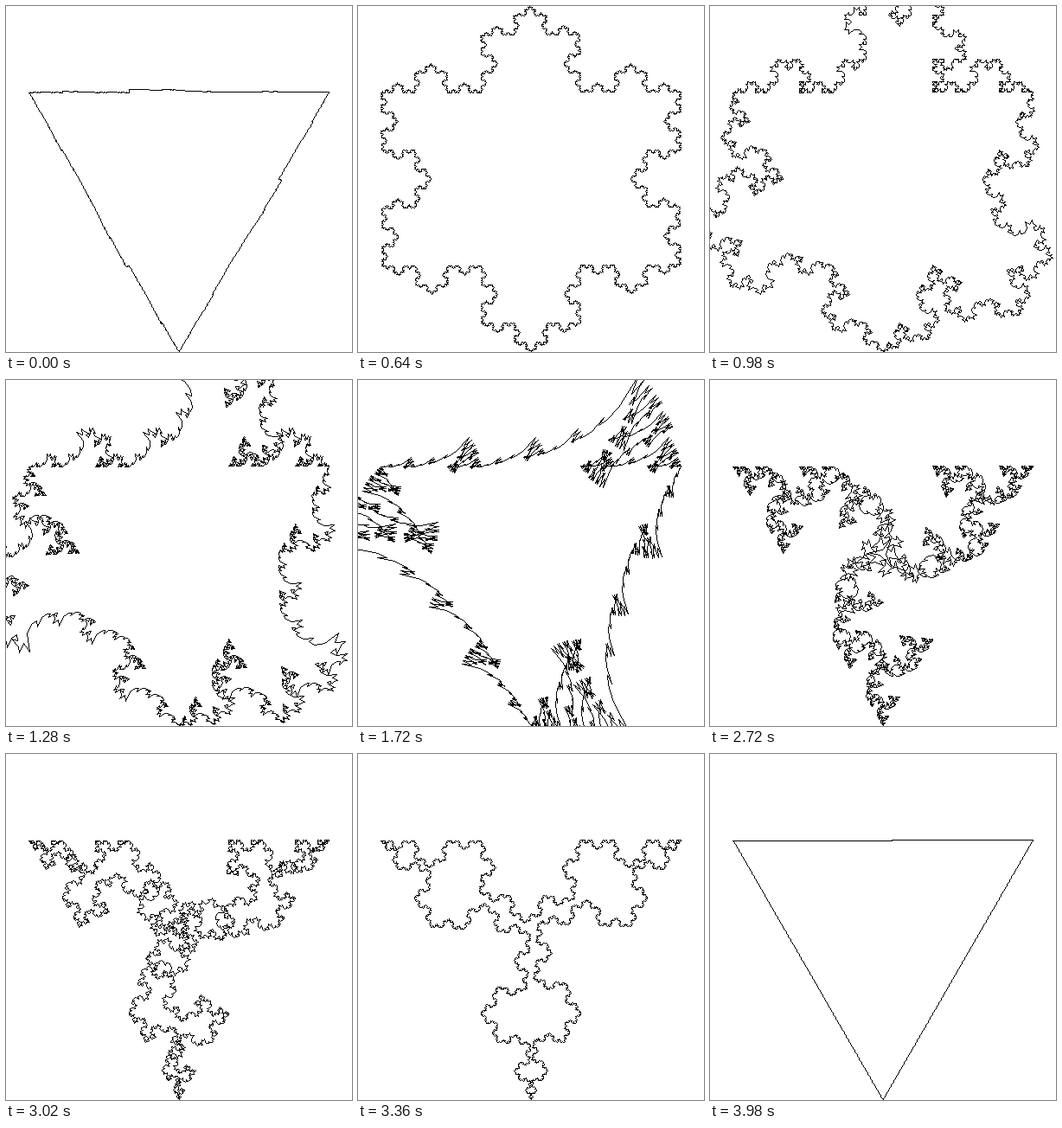
These frames come from a looping animation (400x400 px, 4 s). An HTML page with a canvas:

```html
<!DOCTYPE html>
<html lang="en">
<head>
<meta charset="utf-8">
<title>Turning Koch curve</title>
<style>
html, body { margin: 0; width: 100%; height: 100%; overflow: hidden; background: #fff; }
canvas { display: block; width: 400px; height: 400px; image-rendering: pixelated; }
</style>
</head>
<body>
<canvas id="stage" width="400" height="400"></canvas>
<script>
const SIZE = 400, STEPS = 200, STEP_MS = 20, DEPTH = 5;
const ctx = document.getElementById('stage').getContext('2d');
const image = ctx.createImageData(SIZE, SIZE);
const pixels = new Uint32Array(image.data.buffer);
const WHITE = 0xffffffff, BLACK = 0xff000000;

function corner(angle) {
  return [200 + 200 * Math.cos(angle), 200 + 200 * Math.sin(angle)];
}
const right = corner(11 * Math.PI / 6);
const left = corner(7 * Math.PI / 6);
const bottom = corner(Math.PI / 2);

// Crisp one-pixel line between whole-pixel points
function line(x0, y0, x1, y1) {
  x0 = Math.floor(x0); y0 = Math.floor(y0);
  x1 = Math.floor(x1); y1 = Math.floor(y1);
  const dx = Math.abs(x1 - x0), dy = -Math.abs(y1 - y0);
  const sx = x0 < x1 ? 1 : -1, sy = y0 < y1 ? 1 : -1;
  let err = dx + dy;
  for (;;) {
    if (x0 >= 0 && x0 < SIZE && y0 >= 0 && y0 < SIZE) pixels[y0 * SIZE + x0] = BLACK;
    if (x0 === x1 && y0 === y1) return;
    const e2 = 2 * err;
    if (e2 >= dy) { err += dy; x0 += sx; }
    if (e2 <= dx) { err += dx; y0 += sy; }
  }
}

// The middle third swings around its first end by the turn angle
function koch(ax, ay, bx, by, cos, sin, depth) {
  if (depth === 0) return line(ax, ay, bx, by);
  const dx = (bx - ax) / 3, dy = (by - ay) / 3;
  const px = ax + dx, py = ay + dy;
  const qx = px + dx * cos - dy * sin, qy = py + dx * sin + dy * cos;
  const rx = ax + 2 * dx, ry = ay + 2 * dy;
  koch(ax, ay, px, py, cos, sin, depth - 1);
  koch(px, py, qx, qy, cos, sin, depth - 1);
  koch(qx, qy, rx, ry, cos, sin, depth - 1);
  koch(rx, ry, bx, by, cos, sin, depth - 1);
}

function draw(step) {
  const turn = (step + 1) * 2 * Math.PI / STEPS;
  const cos = Math.cos(turn), sin = Math.sin(turn);
  pixels.fill(WHITE);
  koch(...right, ...left, cos, sin, DEPTH);
  koch(...left, ...bottom, cos, sin, DEPTH);
  koch(...bottom, ...right, cos, sin, DEPTH);
  ctx.putImageData(image, 0, 0);
}

let start = null, shown = 0;
function tick(now) {
  if (start === null) start = now;
  const step = Math.floor((now - start) / STEP_MS + 1e-6) % STEPS;
  if (step !== shown) draw(shown = step);
  requestAnimationFrame(tick);
}
draw(0);
requestAnimationFrame(tick);
</script>
</body>
</html>
```
